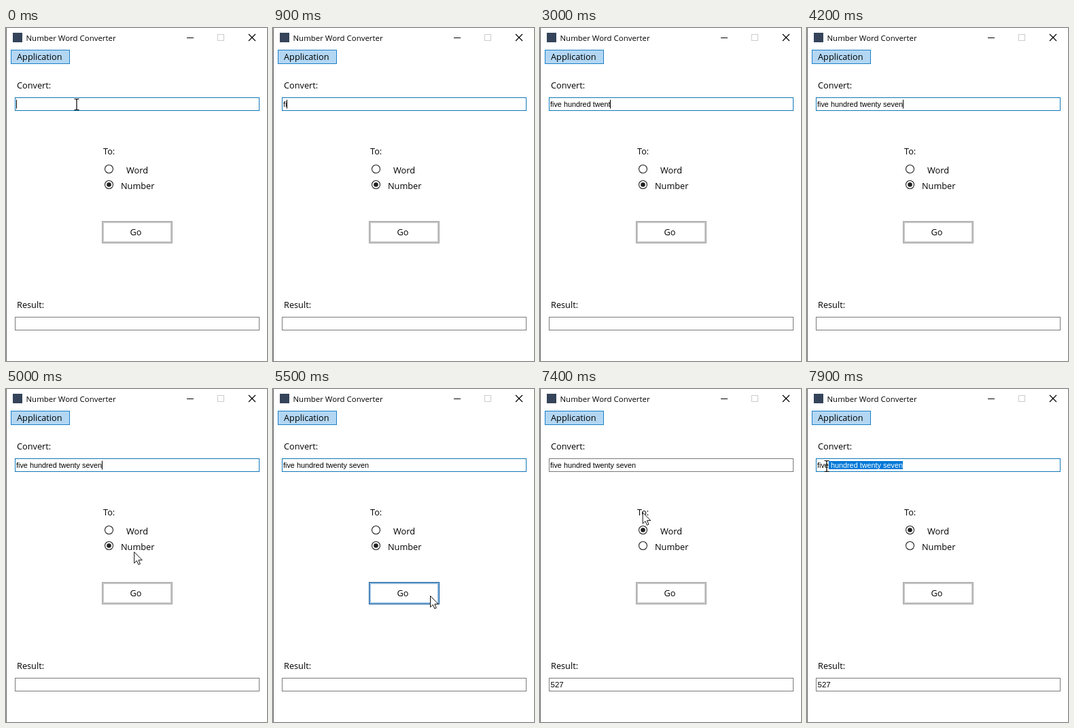
An HTML page for the animation above (8 s loop, 384 px wide and 490 px high).

```html
<!DOCTYPE html>
<html lang="en">
<head>
<meta charset="utf-8">
<title>Number Word Converter</title>
<style>
  html, body { margin: 0; width: 100%; height: 100%; overflow: hidden; background: #fff; }
  svg { display: block; width: 384px; height: 490px; }
  text { font: 12.75px "Open Sans", "Noto Sans", sans-serif; fill: #000; white-space: pre; }
  .title { font-size: 11.45px; }
  .field { font: 10.85px "Liberation Sans", Arial, sans-serif; }
  .line { fill: none; stroke: #000; }
  .box { fill: #fff; stroke: #7a7a7a; }
</style>
</head>
<body>
<svg viewBox="0 0 384 490">
  <rect width="384" height="490" fill="#fff"/>
  <path d="M.5 0V490" stroke="#686868"/>
  <rect x="10" y="7" width="14" height="14" fill="#35445a"/>
  <text class="title" x="29.5" y="19">Number Word Converter</text>
  <path class="line" d="M266 14.5h10"/>
  <path class="line" d="M357 9l10 10M367 9l-10 10" stroke-width="1.2"/>
  <rect x="311.5" y="9.5" width="9" height="9" fill="none" stroke="#ccc"/>

  <rect x="7.5" y="32.5" width="86" height="20" fill="#b3d7f3" stroke="#1c7fc6"/>
  <text x="16" y="47">Application</text>
  <text x="16" y="89">Convert:</text>
  <text x="143" y="186">To:</text>
  <text x="177" y="214">Word</text>
  <text x="169" y="237">Number</text>
  <text x="16" y="412">Result:</text>

  <g fill="none" stroke="#222" stroke-width="1.1">
    <circle cx="151.5" cy="207.5" r="6"/>
    <circle cx="151.5" cy="230.5" r="6"/>
  </g>
  <circle id="dot" cx="151.5" r="3.3" fill="#222"/>

  <rect id="goOuter" x="141.5" y="284.5" width="103" height="32" fill="#fff"/>
  <rect id="goInner" x="143" y="286" width="100" height="29" fill="none"/>
  <text x="182.5" y="305">Go</text>

  <rect id="input" x="13.5" y="102.5" width="359" height="19" fill="#fff"/>
  <text id="typed" class="field" x="15" y="116"></text>
  <rect id="selection" y="106" height="12" fill="#0078d7"/>
  <text id="selected" class="field" y="116" style="fill:#fff"></text>
  <path id="caret" d="M0 105.5v13" class="line"/>

  <rect class="box" x="13.5" y="425.5" width="359" height="19"/>
  <text id="result" class="field" x="15.5" y="439" style="font-size:11.5px"></text>

  <path id="beam" class="line" d="M-3.5 -7.5h2.5l1 1l1 -1h2.5M0 -6.5v14M-3.5 8.5h2.5l1 -1l1 1h2.5" stroke-width="1.2"/>
  <path id="arrow" d="M0 0V16.5L3.8 12.9L6.3 18.7L8.8 17.6L6.4 12H11.7Z" fill="#fff" stroke="#111"/>
</svg>
<script>
const LOOP = 8000, STEP = 100;
const PHRASE = "five hundred twenty seven";
const TEXT_X = 15;
const TYPE_START = 500, KEY_MS = 137, BLINK = 530;
const PRESS = 5400, RELEASE = 5750, PICK_WORD = 7250, DRAG = 7600;

// time, x, y
const PATH = [
  [4450, 104, 112], [5350, 231.5, 304.5], [5500, 231.5, 304.5], [5800, 223.5, 295],
  [6800, 223.5, 295], [7200, 154, 206], [7300, 154, 206], [7600, 143, 112], [7900, 29, 113]
];

// outer and inner border colours, inner border width
const BUTTON = {
  idle: ["#a6a6a6", "#c4c4c4", 2],
  pressed: ["#0f5a9c", "#8fb8dc", 2],
  active: ["#1b7fc4", "#fff", 1]
};

const el = {};
document.querySelectorAll("[id]").forEach(node => el[node.id] = node);

const set = (node, attrs) => Object.entries(attrs).forEach(([k, v]) => node.setAttribute(k, v));
const show = (node, on) => set(node, { visibility: on ? "visible" : "hidden" });
const ease = p => p * p * (3 - 2 * p);

function pointerAt(t) {
  if (t <= PATH[0][0]) return PATH[0].slice(1);
  const i = PATH.findIndex(p => p[0] >= t);
  if (i < 0) return PATH[PATH.length - 1].slice(1);
  const [t0, x0, y0] = PATH[i - 1], [t1, x1, y1] = PATH[i];
  const p = ease((t - t0) / (t1 - t0));
  return [x0 + (x1 - x0) * p, y0 + (y1 - y0) * p];
}

let edges;
function measure() {
  edges = [TEXT_X];
  for (let n = 1; n <= PHRASE.length; n++) {
    el.typed.textContent = PHRASE.slice(0, n);
    edges.push(TEXT_X + el.typed.getComputedTextLength());
  }
}

const nearestEdge = x => edges.reduce((best, e, i) =>
  Math.abs(e - x) < Math.abs(edges[best] - x) ? i : best, 0);

function drawButton(t) {
  const state = t < PRESS || t >= PICK_WORD ? "idle" : t < RELEASE ? "pressed" : "active";
  const [outer, inner, width] = BUTTON[state];
  set(el.goOuter, { stroke: outer });
  set(el.goInner, { stroke: inner, "stroke-width": width });
}

function drawField(t) {
  const count = Math.max(0, Math.min(PHRASE.length, Math.floor((t - TYPE_START) / KEY_MS)));
  const lastKey = count ? TYPE_START + count * KEY_MS : 0;
  const focused = t < RELEASE || t >= DRAG;
  const caretOn = t < PRESS && Math.floor((t - lastKey) / BLINK) % 2 === 0;

  el.typed.textContent = PHRASE.slice(0, count);
  set(el.input, { stroke: focused ? "#0f78b8" : "#7a7a7a" });
  set(el.caret, { transform: `translate(${Math.floor(edges[count]) + 0.5} 0)` });
  show(el.caret, caretOn);

  const head = t >= DRAG ? nearestEdge(pointerAt(t)[0]) : PHRASE.length;
  const left = edges[head];
  set(el.selection, { x: left, width: edges[PHRASE.length] - left });
  set(el.selected, { x: left });
  el.selected.textContent = PHRASE.slice(head);
}

function drawPointer(t) {
  const [x, y] = pointerAt(t);
  const visible = t < TYPE_START + KEY_MS || t >= PATH[0][0];
  const overField = y > 102 && y < 122;
  const move = { transform: `translate(${x} ${y})` };
  set(el.beam, move);
  set(el.arrow, move);
  show(el.beam, visible && overField);
  show(el.arrow, visible && !overField);
}

function draw(t) {
  drawButton(t);
  drawField(t);
  drawPointer(t);
  set(el.dot, { cy: t < PICK_WORD ? 230.5 : 207.5 });
  el.result.textContent = t < RELEASE ? "" : "527";
}

measure();
const start = performance.now();
function tick() {
  const t = (performance.now() - start) % LOOP;
  draw(Math.floor(t / STEP) * STEP);
  requestAnimationFrame(tick);
}
tick();
</script>
</body>
</html>
```
